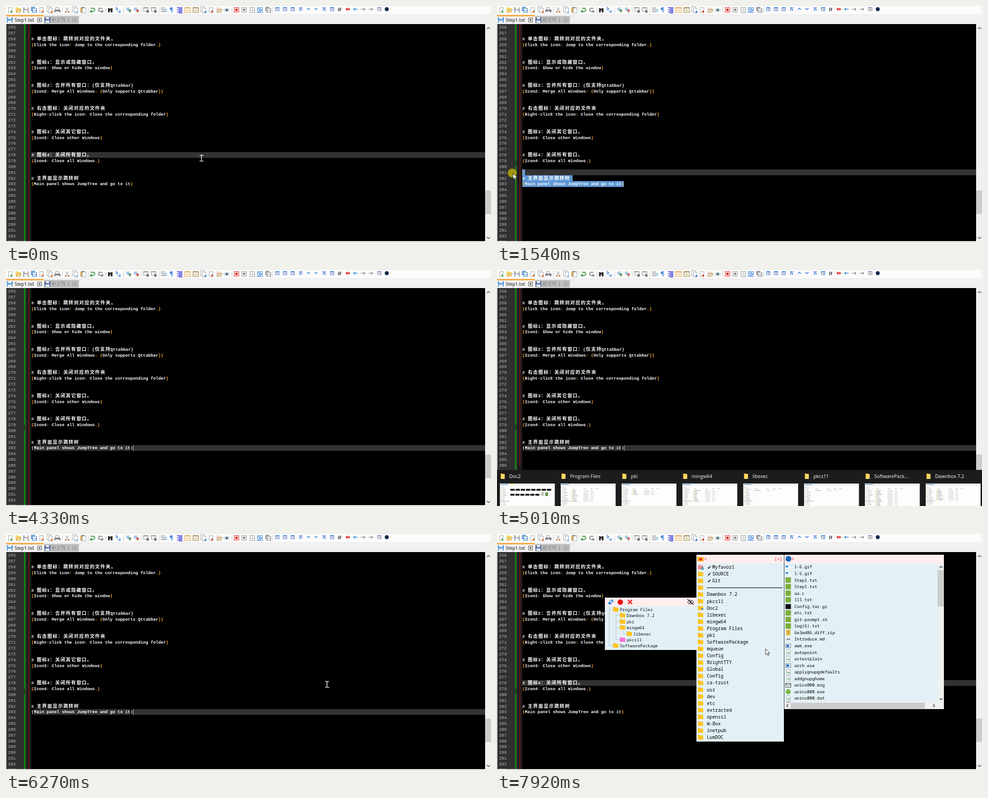
Write an HTML page with a canvas that moves like this. It is 1070 px wide and 523 px high and loops after 7.99 s.

```html
<!DOCTYPE html>
<html lang="zh">
<head>
<meta charset="utf-8">
<title>Editor and jump panels</title>
<style>
html, body { margin: 0; width: 100%; height: 100%; overflow: hidden; background: #000; }
canvas { display: block; }
</style>
</head>
<body>
<canvas id="stage" width="1070" height="523"></canvas>
<script>
const g = document.getElementById('stage').getContext('2d');
const LOOP = 7990, TOP = 41, ROW = 12.85, COL = 5.6, WIDE = 11.7, LEFT = 56;
const CODE = 'bold 9.33px "Liberation Mono", monospace';
const HAN = 'bold 10.3px "Noto Sans CJK SC", "Noto Sans CJK", sans-serif';
const MONO = '"Noto Sans Mono", "DejaVu Sans Mono", monospace';
const UI = '"Open Sans", "Noto Sans", sans-serif';
const YELLOW = '#ffc425', BLUE = '#2f7fd6', GRAY = '#8c8c8c';

const LINES = {
  2: '# 单击图标：跳转到对应的文件夹。',
  3: '(Click the icon: Jump to the corresponding folder.)',
  6: '# 图标1：显示或隐藏窗口。',
  7: '(Icon1: Show or hide the window)',
  10: '# 图标2：合并所有窗口：(仅支持Qttabbar)',
  11: '(Icon2: Merge All Windows: (Only supports Qttabbar))',
  14: '# 右击图标：关闭对应的文件夹',
  15: '(Right-click the icon: Close the corresponding folder)',
  18: '# 图标3：关闭其它窗口。',
  19: '(Icon3: Close other Windows)',
  22: '# 图标4：关闭所有窗口。',
  23: '(Icon4: Close all Windows.)',
  26: '# 主界面显示跳转树',
  27: '(Main panel shows JumpTree and go to it)'
};
const WINDOWS = ['Doc2', 'Program Files', 'pki', 'mingw64', 'libexec', 'pkcs11', 'SoftwarePack...', 'Dawnbox 7.2'];
const FOLDERS = ['✔Myfavor1', '✔SOURCE', '✔Git', '', 'Dawnbox 7.2', 'pkcs11', 'Doc2', 'libexec', 'mingw64',
  'Program Files', 'pki', 'SoftwarePackage', 'mqueue', 'Config', 'BrightTTY', 'Global', 'Config', 'ca-trust',
  'usr', 'dev', 'etc', 'extracted', 'openssl', 'W-Box', 'inetpub', 'LumDOC'];
const FILES = ['1-6.gif', '1-5.gif', 'Step1.txt', 'Step1.txt', 'aa.c', '111.txt', 'Config.tar.gz', 'etc.txt',
  'git-prompt.sh', 'log(6).txt', '6e3ed86.diff.zip', 'Introduce.md', 'awk.exe', 'autopoint', 'astextplain',
  'arch.exe', 'applygnupgdefaults', 'addgnupghome', 'unins000.msg', 'unins000.exe', 'unins000.dat'];
const TREE = [[0, 'Program Files'], [1, 'Dawnbox 7.2'], [1, 'pki'], [1, 'mingw64'], [2, 'libexec'], [1, 'pkcs11'], [0, 'SoftwarePackage']];

// Bursts of picture changes: first time, last time, count
const STEPS = [[0, 0, 1], [420, 420, 1], [650, 1410, 12], [1460, 2200, 12], [2280, 2470, 4], [2930, 2930, 1],
  [3480, 3480, 1], [3670, 4130, 8], [4330, 4330, 1], [4920, 5010, 2], [5310, 6070, 12], [6120, 6870, 12],
  [6930, 7130, 4], [7330, 7530, 4], [7860, 7920, 2]]
  .flatMap(([a, b, n]) => Array.from({ length: n }, (_, i) => n > 1 ? a + (b - a) * i / (n - 1) : a));

// Pointer path: time, x, y
const PATH = [[0, 431, 337], [600, 431, 337], [800, 350, 385], [930, 300, 392], [1200, 204, 400], [1410, 38, 381],
  [1800, 27, 345], [2000, 27, 328], [2130, 27, 328], [2200, 61, 333], [2470, 373, 390], [3740, 373, 390],
  [4130, 330, 540], [5250, 70, 540], [5330, 90, 505], [5650, 835, 478], [5800, 835, 476], [6070, 760, 340],
  [6400, 668, 328], [6600, 664, 330], [6720, 664, 360], [6870, 660, 414], [7130, 655, 245], [7800, 655, 245],
  [7920, 592, 254]];
const PRESS = 930, RELEASE = 2130, CLICK = 3735, CLICK2 = 6520;

function pointer(t) {
  const i = PATH.findIndex(p => p[0] > t);
  if (i < 0) return PATH[PATH.length - 1].slice(1);
  const [a, x, y] = PATH[i - 1], [b, u, v] = PATH[i], k = (t - a) / (b - a);
  return [x + (u - x) * k, y + (v - y) * k];
}
function box(x, y, w, h, c) { g.fillStyle = c; g.fillRect(x, y, w, h); }
function frame(x, y, w, h, c) { g.strokeStyle = c; g.lineWidth = 1; g.strokeRect(x + .5, y + .5, w - 1, h - 1); }
function disc(x, y, r, c) { g.fillStyle = c; g.beginPath(); g.arc(x, y, r, 0, 7); g.fill(); }
function line(pts, c, w = 1) {
  g.strokeStyle = c; g.lineWidth = w; g.beginPath();
  for (let i = 0; i < pts.length; i += 2) g.lineTo(pts[i], pts[i + 1]);
  g.stroke();
}
function text(s, x, y, font, c) { g.font = font; g.fillStyle = c; g.fillText(s, x, y); }
function folder(x, y, c = YELLOW, w = 12) {
  box(x, y - 5, w * .45, 3, c === YELLOW ? '#e8a317' : c);
  box(x, y - 4, w, 9, c);
}
function page(x, y, c) {
  box(x - 4, y - 6, 9, 12, '#fff'); frame(x - 4, y - 6, 9, 12, '#9aa4ae');
  if (c) box(x + 1, y + 1, 4, 4, c);
}
const isHan = ch => ch > '\u2e80';
const width = s => [...s].reduce((w, ch) => w + (isHan(ch) ? WIDE : COL), 0);
const rowTop = r => TOP + r * ROW;
const rowEnd = r => LEFT + width(LINES[r] || '');

// Toolbar icons, each drawn around its centre
const ICONS = {
  page(x, c) { page(x, 9, c); },
  pages(x, c) { page(x - 2, 7); page(x + 2, 10, c); },
  folder(x, c) { folder(x - 6, 8, c, 11); line([x - 5, 14, x - 2, 8, x + 7, 8, x + 4, 14, x - 5, 14], '#b08838'); },
  disk(x, c) { box(x - 6, 3, 12, 12, c); box(x - 3, 3, 7, 4, '#fff'); box(x - 4, 9, 8, 6, '#e6eef6'); },
  disks(x, c) { box(x - 6, 2, 9, 9, c); box(x - 3, 5, 10, 10, c); box(x - 2, 6, 7, 3, '#fff'); box(x - 1, 10, 6, 4, '#dde8f2'); },
  print(x) { box(x - 4, 3, 8, 5, '#fff'); frame(x - 4, 3, 8, 6, GRAY); box(x - 6, 8, 13, 6, '#7c8490'); box(x - 4, 12, 8, 3, '#fff'); },
  cut(x) { line([x - 3, 3, x + 2, 11], '#888'); line([x + 3, 3, x - 2, 11], '#888'); disc(x - 3, 13, 2, '#c08858'); disc(x + 3, 13, 2, '#c08858'); },
  paste(x) { box(x - 6, 3, 11, 12, '#d9a860'); box(x - 3, 2, 5, 3, '#888'); page(x + 2, 10); },
  turn(x, c) {
    const d = c === GRAY ? -1 : 1;
    line([x - 4 * d, 5, x + 3 * d, 5, x + 5 * d, 8, x + 3 * d, 12, x - 5 * d, 12], c, 2);
    line([x - 2 * d, 9, x - 5 * d, 12, x - 2 * d, 15], c, 2);
  },
  find(x) { box(x - 5, 5, 4, 9, '#333'); box(x + 1, 5, 4, 9, '#333'); box(x - 1, 6, 2, 4, '#333'); },
  swap(x) { text('b', x - 6, 9, 'bold 9px ' + UI, BLUE); text('a', x, 15, 'bold 9px ' + UI, BLUE); line([x - 3, 10, x, 13], GRAY); },
  zoom(x, c) { line([x, 10, x + 5, 15], '#888', 1.5); disc(x - 1, 7, 4, '#a8c8e0'); box(x + 1, 8, 5, 4, c); },
  lock(x) { frame(x - 6, 3, 11, 9, GRAY); box(x - 6, 3, 11, 2, GRAY); box(x + 1, 9, 5, 6, '#777'); },
  wrap(x) { for (let i = 0; i < 3; i++) box(x - 6, 4 + i * 4, 9, 1, '#456'); line([x + 2, 8, x + 6, 8, x + 6, 12, x + 1, 12], BLUE); },
  rows(x, c) { for (let i = 0; i < 6; i++) box(x - 6 + i % 2 * 4, 3 + i * 2.4, 12 - i % 2 * 4, 1.3, c); },
  win(x, c) { box(x - 6, 3, 13, 12, '#fff6e6'); frame(x - 6, 3, 13, 12, c); box(x - 6, 3, 13, 2, c); line([x - 3, 12, x, 8, x + 4, 12], c); },
  tile(x, c) { frame(x - 5, 3, 11, 11, c); box(x - 2, 6, 5, 5, c); },
  eye(x) { g.fillStyle = '#cfdbe2'; g.beginPath(); g.ellipse(x, 9, 7, 4.5, 0, 0, 7); g.fill(); disc(x, 9, 2.5, '#42627a'); },
  play(x, c) { frame(x - 5, 3, 11, 12, c); line([x - 1, 6, x + 3, 9, x - 1, 12], c); },
  skip(x, c) { frame(x - 6, 3, 12, 12, c); line([x - 4, 5, x, 9, x - 4, 13], c, 1.5); line([x, 5, x + 4, 9, x, 13], c, 1.5); },
  mini(x, c) { frame(x - 4, 3, 9, 8, c); box(x - 4, 3, 9, 2, c); box(x - 1, 7, 4, 1.5, '#d86060'); },
  up(x, c) { line([x - 3.5, 8, x, 5, x + 3.5, 8], c, 1.6); },
  down(x, c) { line([x - 3.5, 5, x, 8, x + 3.5, 5], c, 1.6); },
  ends(x, c) { box(x - 4, 3, 8, 1, c); line([x - 3, 8, x, 5, x + 3, 8], c, 1.5); box(x - 4, 9, 8, 1, c); },
  left(x, c) { line([x + 5, 7, x - 4, 7], c, 1.4); line([x - 1, 4, x - 4, 7, x - 1, 10], c, 1.4); },
  right(x, c) { line([x - 5, 7, x + 4, 7], c, 1.4); line([x + 1, 4, x + 4, 7, x + 1, 10], c, 1.4); },
  both(x, c) { ICONS.left(x, c); ICONS.right(x, c); },
  dot(x, c) { disc(x, 7, 4.5, c); }
};
const BAR = `9 page #5fb760|27 folder #ffd978|44 disk #a0a0a0|61 disks #6a9cd0|78 page #e87838|96 pages #e87838|113 print
135 cut|152 pages #9cc4ec|170 paste|191 turn #4c9a4c|209 turn #8c8c8c|230 find|248 swap|270 zoom #3c9a50|287 zoom #d8503c
309 lock|326 lock|348 wrap|383 rows #2020d0|400 win #d99a3c|418 win #8f7a48|435 pages #4c90d8|452 page #d84a3a
470 folder #ecd8d0|487 eye|508 tile #e01010|525 tile #8c8c8c|543 play #8c8c8c|560 skip #2f7fd6|578 disks #a0a0a0
598 mini #2f7fd6|615 mini #2f7fd6|632 mini #2f7fd6|650 ends #2f6fd6|667 up #2f6fd6|684 down #2f6fd6|702 ends #2f6fd6
719 mini #2f7fd6|754 both #e02020|771 left #2f7fd6|788 right #8c8c8c|805 right #8c8c8c|823 mini #6c8cb0|840 dot #14304c`
  .split(/[|\n]/).map(s => s.split(' '));

function toolbar() {
  box(0, 0, 1070, 20, '#fbfbfb');
  box(0, 18, 1070, 22, '#f0f0f0');
  for (const [x, kind, c] of BAR) ICONS[kind](+x, c);
  for (const x of [124, 181, 220, 259, 298, 337, 498, 588]) box(x, 2, 1, 14, '#c8c8c8');
  text('¶', 361, 13, 'bold 12px ' + UI, BLUE);
  text('H', 732, 11, 'italic bold 10px "Liberation Serif", serif', '#222');
  box(0, 20, 83, 20, '#f4f4f4'); box(0, 20, 83, 3, '#faa53c');
  box(84, 22, 77, 17, '#c0c0c0');
  for (const [x, c, k] of [[8, '#5a9bd8', '#555'], [91, '#5a6c9c', '#999']]) {
    box(x - 6, 25, 13, 12, c); box(x - 3, 25, 7, 4, '#e8f0f8'); box(x - 4, 32, 9, 5, '#dce8f4');
    const q = x < 50 ? 74 : 152;
    frame(q - 5, 26, 10, 10, k);
    line([q - 2, 29, q + 2, 33], k, 1.5); line([q + 2, 29, q - 2, 33], k, 1.5);
  }
  text('Step1.txt', 19, 34.5, '10.3px ' + UI, '#000');
  text('新文件 1', 100, 34.5, '10.8px "Noto Sans CJK SC", sans-serif', '#808080');
}

function codeLine(r, braces) {
  const s = LINES[r], y = rowTop(r) + 9.4;
  let x = LEFT;
  for (const run of s.match(/[\u2e80-\uffff]|[():.-]|[^\u2e80-\uffff():.-]+/g)) {
    const op = s[0] === '(' && /^[():.-]$/.test(run) && !(braces && /[()]/.test(run));
    text(run, isHan(run) ? x + .7 : x, y, isHan(run) ? HAN : CODE, op ? '#ffb02e' : '#fff');
    x += width(run);
  }
}

// Caret and selection state at a time
function editing(t) {
  if (t < PRESS) return { row: 22, x: rowEnd(22), caret: t >= 420 };
  if (t < CLICK) {
    const [px, py] = pointer(Math.min(t, RELEASE));
    const row = Math.min(28, Math.floor((py + 2 - TOP) / ROW));
    const x = Math.max(LEFT, Math.min(rowEnd(row), LEFT + Math.round((px - LEFT) / COL) * COL));
    return { row, x, sel: true, caret: t < 2930 || t >= 3480 };
  }
  if (t < CLICK2) return { row: 27, x: rowEnd(27), braces: true, caret: t >= 4330 };
  return { row: 22, x: rowEnd(22), caret: t < 7060 };
}

function select(e) {
  let a = [e.row, e.x], b = [27, rowEnd(27)];
  if (a[0] > b[0] || a[0] === b[0] && a[1] > b[1]) [a, b] = [b, a];
  for (let r = a[0]; r <= b[0]; r++) {
    const from = r === a[0] ? a[1] : LEFT, to = r === b[0] ? b[1] : rowEnd(r) + 6;
    box(from, rowTop(r), to - from, ROW + .3, '#5f97d4');
  }
}

function editor(t, panel) {
  const e = editing(t);
  box(0, 40, 1070, 483, '#000');
  box(0, 40, 1, 483, '#d8d8d8');
  box(1, 40, 44, 481, '#303030');
  box(45, 40, 11, 481, '#1c1c1c');
  box(40, 40, 2.5, 481, '#0a9a0a');
  if (t > 1460) box(40, 343, 2.5, 12, '#0a4a0a');
  box(50, 40, 1, panel ? 394 : 481, '#c01010');
  box(LEFT, rowTop(e.row), 1001, ROW, '#333');
  if (e.sel) select(e);
  if (e.braces) for (const x of [LEFT, e.x - COL]) box(x, rowTop(27), COL, ROW, '#000');
  for (let r = 0; r < 38; r++) {
    text(String(256 + r), 4.5, rowTop(r) + 9.4, '9.33px "Liberation Mono", monospace', '#c0c0c0');
    if (LINES[r]) codeLine(r, e.braces && r === 27);
  }
  if (e.caret) box(Math.round(e.x), rowTop(e.row), 1, ROW, '#ddd');
  box(1057, 40, 13, 481, '#f0f0f0');
  box(1057, 409, 13, 52, '#cdcdcd');
  line([1061, 51, 1064.5, 47.5, 1068, 51], '#505050', 1.5);
  line([1061, 512, 1064.5, 515.5, 1068, 512], '#505050', 1.5);
  box(0, 521, 1070, 2, '#f0f0f0');
}

function thumb(i, x) {
  box(x, 473, 121, 50, '#fdfdfd');
  box(x, 473, 121, 1.5, '#b8cde0');
  box(x, 477, 121, 1, '#e0e4e8');
  box(x + 2, 475, 16, 1, '#4a7ab0');
  let seed = i + 3;
  const rnd = () => (seed = seed * 16807 % 2147483647) / 2147483647;
  for (let k = 0; k < 12; k++) {
    box(x + 3, 482 + k * 3.4, 1.5, 1.5, k % 3 ? '#e8c870' : '#70a8d8');
    box(x + 6, 482 + k * 3.4, 4 + rnd() * 7, 1, '#aaa');
  }
  box(x + 1, 511, 20, 2.5, '#ddd');
  if (i === 0) {
    for (let k = 0; k < 8; k++) box(x + 23 + k * 11.5, 485, 9.5, 4, '#111');
    for (let k = 0; k < 6; k++) box(x + 23 + k * 11, 496, 9, 4, '#111');
    box(x + 23, 473, 7, 2, '#d8d020'); box(x + 91, 493, 6, 7, '#b8c8b0'); box(x + 100, 493, 6, 8, '#589048');
    return;
  }
  for (const c of [25, 50, 65, 77]) box(x + c, 484, 6, 1, '#bbb');
  const n = [0, 9, 4, 9, 1, 1, 12, 8][i];
  for (let k = 0; k < n; k++) {
    const y = 488 + k * 3;
    box(x + 23, y, 1.5, 1.5, '#e8c060');
    box(x + 26, y, 5 + rnd() * 9, 1, '#999');
    box(x + 50, y, 11, 1, '#c4c4c4'); box(x + 65, y, 7, 1, '#d0d0d0');
  }
}

function previews(t, [px, py]) {
  g.globalAlpha = t < 5000 ? .55 : 1;
  box(0, 443, 1070, 80, '#1c1c1c');
  WINDOWS.forEach((name, i) => {
    const x = i * 134.2, hot = py < 523 && py > 443 && px >= x && px < x + 134.2;
    if (hot) {
      box(x, 443, 134, 80, '#3a3a3a');
      line([x + 116, 452, x + 125, 461], '#fff'); line([x + 125, 452, x + 116, 461], '#fff');
    }
    box(x + 8, 451, 5, 12, '#e8a820'); box(x + 9, 452, 8, 11, '#ffd868');
    text(name, x + 27, 461, '10.6px ' + UI, '#fff');
    thumb(i, x + 6.5);
  });
  g.globalAlpha = 1;
}

function pane(x, y, w, h, head) {
  box(x, y, w, h, '#e3f1f6');
  box(x, y, w, head, '#ffeeee');
}

function treePane() {
  pane(238, 141, 202, 116, 19);
  g.save(); g.translate(251, 151); g.rotate(-.8);
  box(-6, -3, 12, 6, BLUE); box(-1, -2, 4, 4, '#d8ecff'); g.restore();
  disc(272, 151, 6, '#ee1111');
  line([289, 146, 298, 155], '#e83030', 3); line([298, 146, 289, 155], '#e83030', 3);
  g.strokeStyle = '#223'; g.lineWidth = 1.2; g.beginPath(); g.ellipse(427, 151, 6, 3.8, 0, 0, 7); g.stroke();
  disc(427, 151, 2, '#223'); line([420, 144, 434, 157], '#223', 1.4);
  const c = '#b4bcc0', y = i => Math.round(167 + i * 13.4) + .5;
  line([247.5, 160, 247.5, y(6)], c);
  line([262.5, y(0) + 5, 262.5, y(5)], c);
  line([277.5, y(3) + 5, 277.5, y(4)], c);
  TREE.forEach(([d, name], i) => {
    const x = 256 + d * 15;
    line([x - 8.5, y(i), x, y(i)], c);
    folder(x, y(i) - .5, name === 'pkcs11' ? '#ff70d8' : YELLOW);
    text(name, x + 15, y(i) + 3, '9.33px ' + MONO, '#111');
  });
}

function folderPane() {
  pane(440, 46, 193, 414, 19);
  folder(442, 55.5, '#ffae1a', 14);
  text('♥', 445, 60, '9px "DejaVu Sans", sans-serif', '#e02030');
  text('>', 457, 59, '10.2px ' + MONO, '#e02020');
  text('[+]', 612, 59, '9.6px ' + MONO, '#e02020');
  FOLDERS.forEach((name, i) => {
    const y = 73.5 + i * 15.08;
    folder(443, y, i ? YELLOW : '#f09090');
    if (!i) { disc(453, y + 3, 3, '#308090'); box(451, y + 2.5, 4, 1, '#fff'); }
    if (name === 'Doc2') disc(453, y + 2, 2, '#3878c0');
    if (i === 3) box(463, 118.5, 167, 1.3, '#111');
    const tick = name[0] === '✔';
    if (tick) text('✔', 464, y + 4, '11px "DejaVu Sans", sans-serif', '#111');
    text(tick ? name.slice(1) : name, tick ? 475 : 463, y + 3.6, '10.2px ' + MONO, '#000');
  });
}

function fileIcon(name, x, y) {
  if (/gif$/.test(name)) { box(x - 5, y - 5, 10, 8, '#f4faff'); box(x - 6, y - 3, 6, 4, '#3c9be0'); box(x + 1, y - 4, 4, 1, '#9cc8e8'); }
  else if (/\.(txt|c|sh)$/.test(name)) box(x - 6, y - 6, 12, 12, '#7fae3c');
  else if (/gz$/.test(name)) box(x - 6, y - 5, 12, 11, '#111');
  else if (/zip$/.test(name)) { box(x - 5, y - 6, 10, 12, '#e8c04a'); for (let k = 0; k < 5; k++) box(x - 1 + k % 2, y - 5 + k * 2, 2, 1, '#775a10'); }
  else if (/md$/.test(name)) text('md', x - 4, y + 2, 'bold 5px ' + UI, '#444');
  else if (/unins.*exe$/.test(name)) disc(x, y, 5.5, '#7cb840');
  else if (/exe$/.test(name)) { box(x - 6, y - 4, 12, 9, '#fff'); frame(x - 6, y - 4, 12, 9, '#667'); box(x - 4, y - 2, 6, 5, '#1878d0'); }
  else if (/msg$/.test(name)) { box(x - 6, y - 4, 12, 9, '#fff'); frame(x - 6, y - 4, 12, 9, '#222'); line([x - 6, y - 3, x, y + 1, x + 6, y - 3], '#222'); }
  else { page(x, y); line([x - 2, y + 1, x + 3, y + 1], '#38a048', 1.5); line([x + 1, y - 1, x + 3, y + 1, x + 1, y + 3], '#38a048'); }
}

function filePane() {
  box(633, 46, 1, 342, '#333');
  pane(634, 46, 352, 342, 19);
  disc(643, 55, 6.5, '#1868b8');
  text('>', 650, 59, '10px ' + MONO, '#e02020');
  FILES.forEach((name, i) => {
    const y = 73 + i * 14.55;
    fileIcon(name, 642.5, y);
    text(name, 656, y + 3.4, '9.33px ' + MONO, '#000');
  });
  box(638, 372, 9, 1, '#555');
  box(972, 66, 14, 322, '#f0f0f0'); box(972, 80, 14, 81, '#cdcdcd');
  box(634, 373, 352, 15, '#f0f0f0'); box(648, 374, 296, 13, '#cdcdcd');
  const c = '#444';
  line([976, 75, 979.5, 71.5, 983, 75], c, 1.5); line([976, 364, 979.5, 367.5, 983, 364], c, 1.5);
  line([642.5, 377, 639, 380.5, 642.5, 384], c, 1.5); line([962, 377, 965.5, 380.5, 962, 384], c, 1.5);
}

function drawPointer(t, [x, y], arrow) {
  const held = t >= PRESS && t < RELEASE || t >= CLICK && t < CLICK + 90 || t >= CLICK2 && t < CLICK2 + 90;
  if (held) disc(x - 1, y, 10, 'rgba(178,164,14,.88)');
  if (arrow) {
    const p = [0, 0, 0, 13, 3, 10.2, 5.2, 15, 7.4, 14, 5.2, 9.4, 9.4, 9.4];
    g.beginPath();
    for (let i = 0; i < p.length; i += 2) g.lineTo(x + .5 + p[i], y + .5 + p[i + 1]);
    g.closePath();
    g.fillStyle = '#fff'; g.fill();
    g.strokeStyle = '#222'; g.lineWidth = 1; g.stroke();
  } else {
    x = Math.round(x); y = Math.round(y);
    box(x - .5, y - 7, 1.5, 14, '#fff');
    for (const v of [-7, 6]) { box(x - 4, y + v, 4, 1.3, '#fff'); box(x + 1, y + v, 4, 1.3, '#fff'); }
  }
}

function draw(t) {
  const p = pointer(t), panel = t >= 4920 && t < 6180, popups = t >= 7330;
  editor(t, panel);
  toolbar();
  if (panel) previews(t, p);
  if (popups) treePane();
  if (t >= 7390) folderPane();
  if (t >= 7460) filePane();
  if (p[1] < 523) drawPointer(t, p, popups || panel && p[1] > 443 || p[0] < 50);
}

const start = performance.now();
let shown = -1;
function tick() {
  const now = (performance.now() - start) % LOOP;
  const t = STEPS.findLast(s => s <= now + .5);
  if (t !== shown) draw(shown = t);
  requestAnimationFrame(tick);
}
tick();
</script>
</body>
</html>
```
